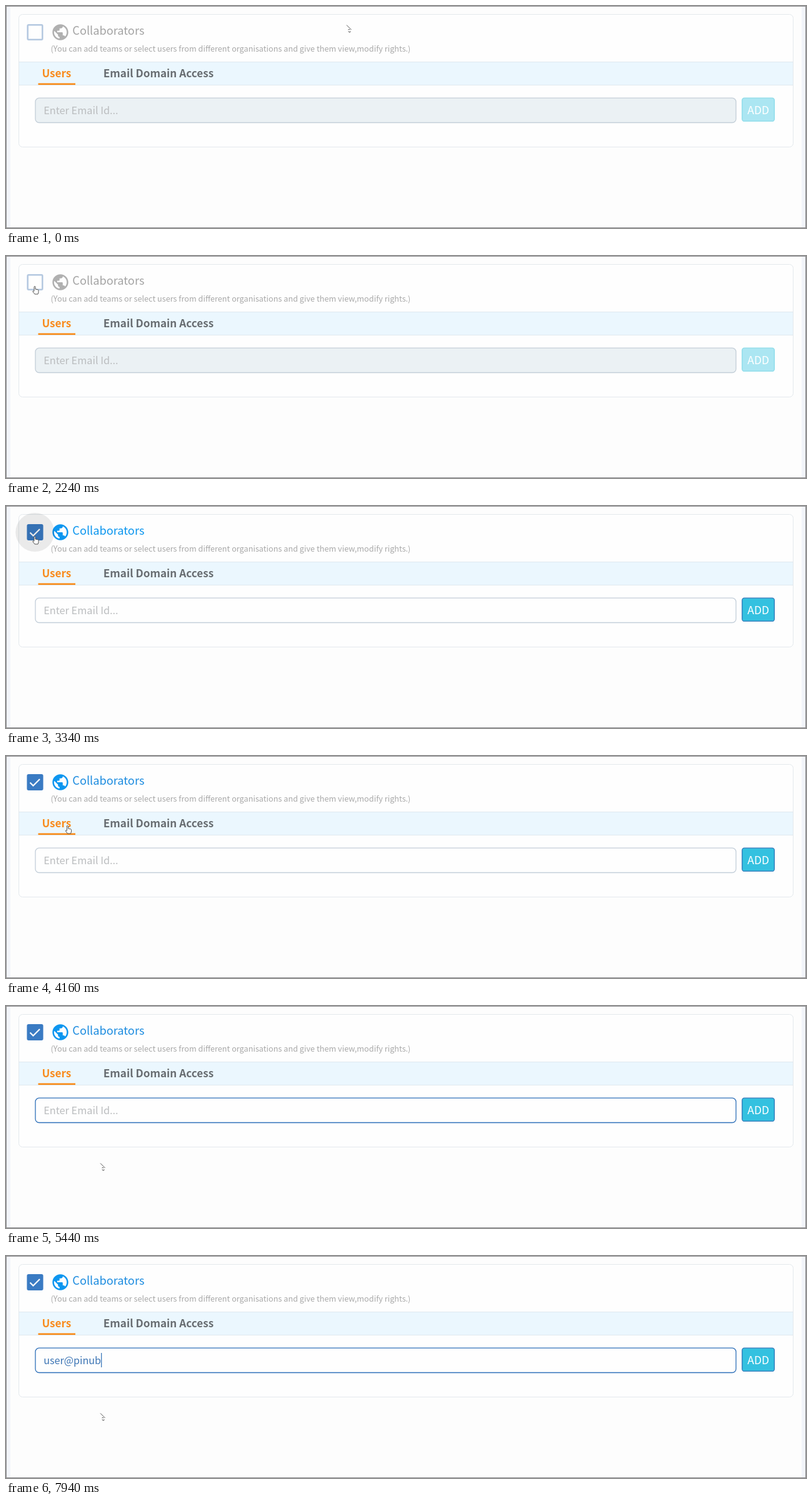
Write an HTML page that moves like this. It is 1280 by 355 pixels and loops after 8000 ms.

```html
<!DOCTYPE html>
<html lang="en">
<head>
<meta charset="utf-8">
<title>Collaborators</title>
<style>
html, body { margin: 0; width: 100%; height: 100%; overflow: hidden; background: #fdfdfd; }
svg { display: block; font-family: "Noto Sans CJK JP", "Noto Sans CJK SC", "Noto Sans CJK", "Open Sans", sans-serif; }
.tab { font-size: 17.15px; font-weight: 700; }
</style>
</head>
<body>
<svg width="1280" height="355" viewBox="0 0 1280 355">
  <rect width="1280" height="355" fill="#f2f5fa"/>
  <rect x="7" width="1266" height="355" fill="#fdfdfd"/>
  <rect x=".5" y=".5" width="1279" height="354" fill="none" stroke="#8c8c8e"/>
  <rect x="20.5" y="13.5" width="1239" height="212" rx="6" fill="#fefefe" stroke="#e4e9ed"/>
  <rect x="21" y="90" width="1238" height="37" fill="#ebf7fe"/>
  <path d="M21 89.5H1259M21 126.5H1259" stroke="#dfe9ef"/>

  <rect id="box" x="34.7" y="30.2" width="23.6" height="23.6" rx="1.5" stroke-width="2.5"/>
  <path id="tick" d="M38.5 42.5l5 5L54 37" fill="none" stroke-width="2.2"/>
  <path id="globe" transform="translate(71.76 26.76) scale(1.27)" d="M12 2C6.48 2 2 6.48 2 12s4.48 10 10 10 10-4.48 10-10S17.52 2 12 2zm-1 17.93c-3.95-.49-7-3.85-7-7.93 0-.62.08-1.21.21-1.79L9 15v1c0 1.1.9 2 2 2v1.93zm6.9-2.54c-.26-.81-1-1.39-1.9-1.39h-1v-3c0-.55-.45-1-1-1H8v-2h2c.55 0 1-.45 1-1V7h2c1.1 0 2-.9 2-2v-.41c2.93 1.19 5 4.06 5 7.41 0 2.08-.8 3.97-2.1 5.39z"/>
  <text id="head" x="106.3" y="45.5" font-size="18.2">Collaborators</text>
  <text x="71.5" y="73" font-size="12.7" fill="#a9a9a9">(You can add teams or select users from different organisations and give them view,modify rights.)</text>

  <text class="tab" x="57.4" y="114.4" fill="#f98b1b">Users</text>
  <text class="tab" x="155.8" y="114.4" fill="#686d71">Email Domain Access</text>
  <rect x="51.5" y="123.5" width="59.5" height="2.6" fill="#f98a16"/>

  <rect id="field" x="47" y="147.2" width="1121" height="39.3" rx="6" stroke-width="1.3"/>
  <text id="hint" x="60.2" y="173" font-size="16.3" fill="#bbbdbf">Enter Email Id...</text>
  <text id="typed" x="60.2" y="173" font-size="16.15" fill="#3e76b5"></text>
  <rect id="caret" y="155" width="1.2" height="23" fill="#2f6fb5"/>
  <rect id="button" x="1177.8" y="147.2" width="51.6" height="37" rx="3.5" stroke-width="1.3"/>
  <text x="1203.7" y="173.3" font-size="17.6" fill="#fff" text-anchor="middle">ADD</text>

  <circle id="ripple" cx="46.3" cy="42"/>
  <g id="cursor" stroke="#444" stroke-width=".9">
    <path id="arrow" fill="none" d="M0 .5L7.5 8M2.5 8l1.5-.7 1.3.9M3 10.2l1 1.8 1.8-.3.2-1.5"/>
    <path id="hand" fill="#fff" d="M3 8V1.5a1 1 0 0 1 2 0V5l4 .8q1 .3 1 1.5V10l-1 3H4L.6 8.6q.4-1.4 2.4 0"/>
    <path id="beam" fill="none" d="M0 .5h2.2l1 1 1-1h2.2M3.2 1.5v13M0 15.5h2.2l1-1 1 1h2.2"/>
  </g>
</svg>
<script>
const LOOP = 8000, MAIL = "user@pinub";
const $ = id => document.getElementById(id);
const set = (id, attrs) => { for (const k in attrs) $(id).setAttribute(k, attrs[k]); };
const show = (id, on) => set(id, { visibility: on ? "visible" : "hidden" });

// Latest entry [time, ...values] that has begun
const at = (list, t) => list.filter(e => e[0] <= t).pop().slice(1);

const pointer = [
  [0, "arrow", 545, 30], [1280, "arrow", 536, 30], [1450, "arrow", 430, 35],
  [1580, "arrow", 300, 48], [1700, "arrow", 204, 61], [1850, "arrow", 140, 58],
  [1970, "arrow", 76, 55], [2120, "hand", 58, 51], [2240, "hand", 42, 48],
  [4160, "hand", 94.5, 111], [4300, "hand", 112, 130], [4420, "arrow", 127, 152],
  [4570, "beam", 131, 157], [5060, "beam", 132, 166], [5200, "arrow", 139, 200],
  [5320, "arrow", 148, 238], [5440, "arrow", 151, 251]
];
const ripples = [[0, 0, 0], [2950, 19.4, .66], [3070, 26, .45], [3220, 29.5, .22], [3340, 31, .08], [3490, 0, 0]];
const boxes = [
  [0, "#fefefe", "#b4c8e0", "none"], [2950, "#4a4d55", "#454951", "#666a6e"],
  [3070, "#3a7bc3", "#3a7bc3", "#fff"]
];
const buttons = [[0, "#abe6f2", "#8adbe9"], [2950, "#7cd8ea", "#3f7cbd"], [3070, "#34c1e0", "#2f77b8"]];
const fields = [[0, "#ebf1f4", "#c3ced8"], [2950, "#fefefe", "#c3ced9"], [4570, "#fefefe", "#7a9fcb"], [4690, "#fefefe", "#2f70b9"]];
const heads = [[0, "#a3a3a3"], [2950, "#0a95ee"], [3490, "#1b8bdf"]];
const globes = [[0, "#b0b0b0"], [2950, "#0d96f0"]];
const typing = [[0, 0], [5940, 1], [6060, 2], [6340, 3], [6590, 4], [7020, 5], [7420, 6], [7540, 7], [7790, 9], [7940, 10]];

function draw(t) {
  const [fill, edge, tick] = at(boxes, t);
  set("box", { fill, stroke: edge });
  set("tick", { stroke: tick });
  for (const [id, list] of [["button", buttons], ["field", fields]]) {
    const [f, s] = at(list, t);
    set(id, { fill: f, stroke: s });
  }
  set("head", { fill: at(heads, t)[0] });
  set("globe", { fill: at(globes, t)[0] });

  const [r, opacity] = at(ripples, t);
  set("ripple", { r, opacity });
  // The first moment of the ripple hides under the box
  if (t >= 2950 && t < 3070) set("ripple", { fill: "#555", opacity: .8 });
  else set("ripple", { fill: "#000" });

  const count = at(typing, t)[0];
  $("typed").textContent = MAIL.slice(0, count);
  show("hint", !count);
  set("caret", { x: 60.2 + (count ? $("typed").getComputedTextLength() : 0) });
  show("caret", (t >= 4690 && t < 5200) || t >= 5690);

  const [kind, x, y] = at(pointer, t);
  set("cursor", { transform: `translate(${x} ${y})` });
  for (const id of ["arrow", "hand", "beam"]) show(id, id === kind);
}

const start = performance.now();
function tick() {
  draw((performance.now() - start) % LOOP);
  requestAnimationFrame(tick);
}
tick();
</script>
</body>
</html>
```
